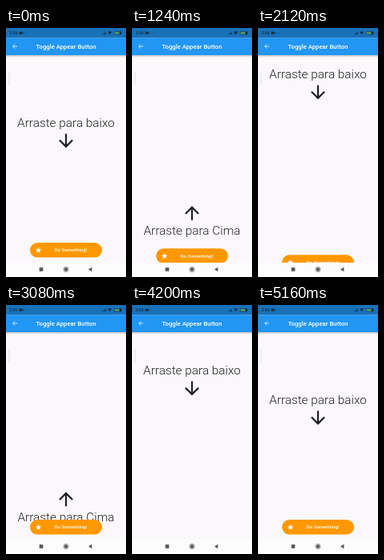
These frames come from a looping animation (150x312 px, 5280 ms). An HTML page with a canvas:

```html
<!DOCTYPE html>
<html lang="pt">
<head>
<meta charset="utf-8">
<title>Toggle Appear Button</title>
<style>
html, body { margin: 0; width: 100%; height: 100%; overflow: hidden; background: #fbf8fb; }
canvas { display: block; width: 150px; height: 312px; }
</style>
</head>
<body>
<canvas id="stage"></canvas>
<script>
const W = 150, H = 312, LOOP = 5280, STEP = 40;
const BAR_TOP = 12.3, BAR_BOTTOM = 34, NAV_TOP = 294;
const FIRST_Y = 119, SECOND_Y = 478.5, ICON_GAP = 22.3;
const SLIDE_MS = 280, SLIDE_PX = 25;
const PAPER = '#fbf8fb', INK = '#202022';

const canvas = document.getElementById('stage');
const ctx = canvas.getContext('2d');
const dpr = window.devicePixelRatio || 1;
canvas.width = W * dpr;
canvas.height = H * dpr;

// A higher skew brings the fast part of a swipe forward
const swipes = [
  { start: 320, end: 1480, to: 235, skew: 1.3 },
  { start: 1600, end: 2440, to: 0, skew: 1.14 },
  { start: 2720, end: 3280, to: 228, skew: 1.8 },
  { start: 3280, end: 3720, to: 264, skew: 1.8 },
  { start: 3840, end: 4360, to: 0, skew: 1.23 }
];
const hides = [1140, 3280], shows = [2000, 4270];

function smooth(u) {
  const v = Math.max(0, Math.min(1, u));
  return v * v * (3 - 2 * v);
}

function scrollAt(t) {
  let y = 0;
  for (const { start, end, to, skew } of swipes) {
    const left = Math.max(0, Math.min(1, (end - t) / (end - start)));
    y += (to - y) * smooth(1 - left ** skew);
  }
  return y;
}

function buttonOffset(t) {
  const total = starts => starts.reduce((sum, s) => sum + smooth((t - s) / SLIDE_MS), 0);
  return SLIDE_PX * (total(hides) - total(shows));
}

function rect(x, y, w, h, color) {
  ctx.fillStyle = color;
  ctx.fillRect(x, y, w, h);
}

function disc(x, y, r, color) {
  ctx.fillStyle = color;
  ctx.beginPath();
  ctx.arc(x, y, r, 0, 2 * Math.PI);
  ctx.fill();
}

function polygon(points, color) {
  ctx.fillStyle = color;
  ctx.beginPath();
  points.forEach(([x, y]) => ctx.lineTo(x, y));
  ctx.closePath();
  ctx.fill();
}

function label(text, x, y, size, weight, color, align = 'center', spacing = 0) {
  ctx.font = `${weight} ${size}px Roboto, sans-serif`;
  ctx.letterSpacing = spacing + 'px';
  ctx.textAlign = align;
  ctx.fillStyle = color;
  ctx.fillText(text, x, y);
}

// Arrow in a 24-unit box, pointing up before rotation
function arrow(x, y, size, turn, color) {
  ctx.save();
  ctx.translate(x, y);
  ctx.rotate(turn);
  ctx.scale(size / 24, size / 24);
  ctx.strokeStyle = color;
  ctx.lineWidth = 2;
  ctx.beginPath();
  ctx.moveTo(-7.3, 0.7);
  ctx.lineTo(0, -6.6);
  ctx.lineTo(7.3, 0.7);
  ctx.moveTo(0, -6.6);
  ctx.lineTo(0, 8);
  ctx.stroke();
  ctx.restore();
}

function star(x, y, r) {
  const points = [];
  for (let i = 0; i < 10; i++) {
    const a = i * Math.PI / 5 - Math.PI / 2, d = i % 2 ? r * 0.42 : r;
    points.push([x + d * Math.cos(a), y + d * Math.sin(a)]);
  }
  polygon(points, '#fff');
}

function drawList(scroll) {
  const first = FIRST_Y - scroll, second = SECOND_Y - scroll;
  label('Arraste para baixo', 75, first + 5.2, 15.35, 300, INK);
  arrow(75, first + ICON_GAP, 26.7, Math.PI, INK);
  arrow(75, second - ICON_GAP, 26.7, 0, INK);
  label('Arraste para Cima', 75, second + 5.2, 15.35, 300, INK);
}

function drawButton(dy) {
  ctx.fillStyle = '#ff9800';
  ctx.beginPath();
  ctx.roundRect(30, 269 + dy, 90, 18.6, 9.3);
  ctx.fill();
  star(40.6, 278.6 + dy, 4);
  label('Do Something!', 60.6, 280.4 + dy, 6, 500, '#fff', 'left', 0.1);
}

function drawStatus() {
  const ink = '#12304c';
  rect(0, 0, W, BAR_TOP, '#1971b8');
  label('2:06', 4.5, 8.2, 5, 500, ink, 'left', 0.1);
  rect(16.5, 4.6, 3.4, 3.2, ink);
  polygon([[19.5, 6.2], [21.5, 4.7], [21.5, 7.7]], ink);
  [24, 26].forEach(x => disc(x, 6.3, 0.45, ink));
  for (let i = 0; i < 4; i++) rect(120.5 + i * 1.2, 7.2 - i * 0.8, 0.8, 1 + i * 0.8, ink);
  polygon([[127.2, 5], [129.7, 4.1], [132.2, 5], [129.7, 8.2]], ink);
  rect(135, 4.2, 9, 4.2, ink);
  rect(135.6, 4.8, 6, 3, '#4f9a6a');
  rect(144, 5.4, 0.8, 1.8, ink);
}

function drawAppBar() {
  const shade = ctx.createLinearGradient(0, BAR_BOTTOM, 0, BAR_BOTTOM + 3);
  shade.addColorStop(0, 'rgba(0,0,0,.22)');
  shade.addColorStop(1, 'rgba(0,0,0,0)');
  rect(0, BAR_BOTTOM, W, 3, shade);
  rect(0, BAR_TOP, W, BAR_BOTTOM - BAR_TOP, '#2196f3');
  arrow(11, 23, 9.15, -Math.PI / 2, '#fff');
  label('Toggle Appear Button', 75, 25.8, 7.75, 500, '#fff');
}

function drawNav() {
  const ink = '#555';
  rect(0, NAV_TOP, W, H - NAV_TOP, '#fcfcfc');
  rect(41.7, 300.2, 4.6, 4.6, ink);
  disc(75, 302.5, 2.2, ink);
  ctx.strokeStyle = ink;
  ctx.lineWidth = 0.6;
  ctx.beginPath();
  ctx.arc(75, 302.5, 3.2, 0, 2 * Math.PI);
  ctx.stroke();
  polygon([[103, 302.5], [107.4, 299.8], [107.4, 305.2]], ink);
}

function draw(now) {
  const t = Math.floor(now % LOOP / STEP) * STEP;
  ctx.setTransform(dpr, 0, 0, dpr, 0, 0);
  rect(0, 0, W, H, PAPER);
  drawList(scrollAt(t));
  rect(3.6, 56, 0.8, 16, '#dcdcde');
  drawButton(buttonOffset(t));
  drawAppBar();
  drawStatus();
  drawNav();
}

const begin = performance.now();
function tick() {
  draw(performance.now() - begin);
  requestAnimationFrame(tick);
}
tick();
</script>
</body>
</html>
```
